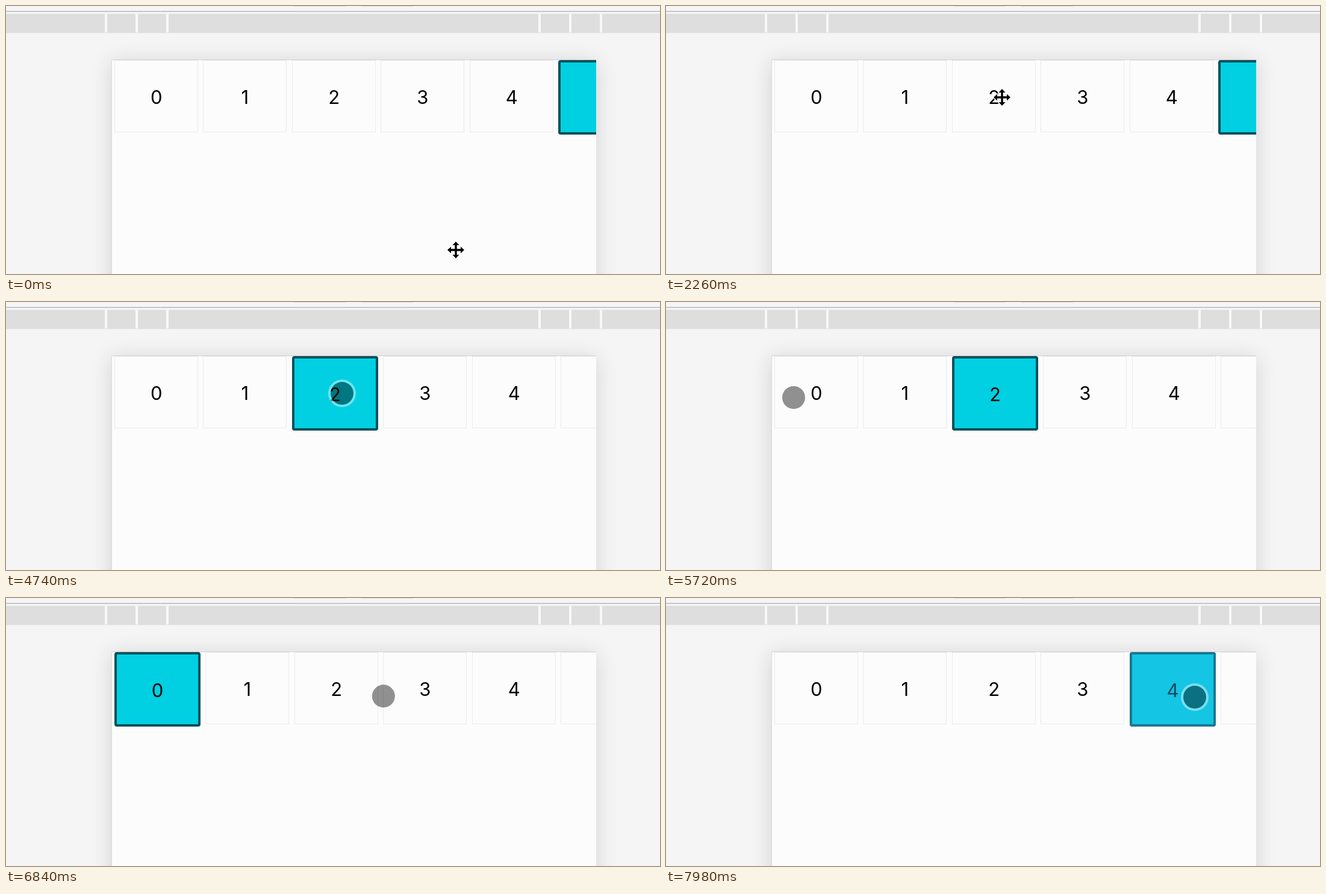
An HTML page with a canvas for the animation above (8 s loop, 1086 px wide and 446 px high).

```html
<!DOCTYPE html>
<html lang="en">
<head>
<meta charset="utf-8">
<style>
html, body { margin: 0; width: 100%; height: 100%; overflow: hidden; background: #f5f5f5; }
canvas { display: block; }
</style>
</head>
<body>
<canvas id="stage" width="1086" height="446"></canvas>
<script>
const ctx = document.getElementById('stage').getContext('2d');
const LOOP = 8000;
const PANEL = { x: 175, y: 89, w: 805, h: 357 };
const PITCH = 147.4;
const TOUCH_START = 3800;

const linear = k => k;
const easeOut = k => 1 - (1 - k) ** 3;
const easeInOut = k => k * k * (3 - 2 * k);

const home = { x: 747, y: 406 };
const moves = [
  { from: 0, to: 1500, x: 648, y: 253, ease: linear },
  { from: 1520, to: 2200, x: 558, y: 152, ease: easeOut },
  { from: 4960, to: 5680, x: 212, y: 159, ease: easeInOut },
  { from: 6450, to: 6945, x: 692, y: 164, ease: easeInOut },
  { from: 7420, to: 7800, x: 878, y: 165, ease: easeInOut }
];

const taps = [
  { time: -1000, cell: 5 },
  { time: 4560, cell: 2 },
  { time: 6200, cell: 0 },
  { time: 7250, cell: 3 },
  { time: 7900, cell: 4 }
];

function rect(x, y, w, h, color) {
  ctx.fillStyle = color;
  ctx.fillRect(x, y, w, h);
}

// the picture advances in short steps, with a brief hold per cycle
function stepTime(t) {
  const phase = (t + 20) % 840;
  const step = 43.5;
  return Math.max(0, t - phase + Math.floor(Math.min(phase, 740) / step + 0.01) * step);
}

function pointerAt(t) {
  let { x, y } = home;
  for (const move of moves) {
    if (t <= move.from) break;
    const k = move.ease(Math.min(1, (t - move.from) / (move.to - move.from)));
    x += (move.x - x) * k;
    y += (move.y - y) * k;
  }
  return { x, y };
}

function drawBackdrop() {
  rect(0, 0, 1086, 446, '#f5f5f5');
  rect(478, 0, 86, 1, '#dcdcdc');
  rect(590, 0, 86, 1, '#dcdcdc');
  rect(0, 8, 1086, 2, '#c6c6ce');

  ctx.save();
  ctx.shadowColor = 'rgba(0, 0, 0, 0.14)';
  ctx.shadowBlur = 34;
  ctx.shadowOffsetY = 4;
  rect(PANEL.x, PANEL.y, PANEL.w, PANEL.h + 100, '#fcfcfc');
  ctx.restore();

  rect(0, 13, 1086, 32, '#dedede');
  for (let i = 0; i < 3; i++) {
    rect(164 + 51 * i, 13, 4, 31, '#f8f8f8');
    rect(884 + 51 * i, 13, 4, 31, '#f8f8f8');
  }

  rect(PANEL.x, PANEL.y, PANEL.w, 1, '#d0d0d8');
  rect(PANEL.x, PANEL.y, 1, PANEL.h, '#dcdce2');
}

function drawLabel(text, x, baseline) {
  ctx.fillStyle = '#000';
  ctx.fillText(text, x, baseline);
}

function drawCells(selected, highlighted) {
  ctx.save();
  ctx.beginPath();
  ctx.rect(PANEL.x, PANEL.y, PANEL.w, PANEL.h);
  ctx.clip();
  ctx.font = '31px Inter, "Open Sans", sans-serif';
  ctx.textAlign = 'center';
  for (let i = 0; i < 6; i++) {
    const x = Math.round(180 + PITCH * i + (i > selected ? 4 : 0));
    if (i !== selected) {
      ctx.strokeStyle = '#ebebee';
      ctx.lineWidth = 1;
      ctx.strokeRect(x + 0.5, 90.5, 138, 119);
      drawLabel(i, x + 69.7, 163);
      continue;
    }
    ctx.beginPath();
    ctx.roundRect(x, 90, 143, 124, 4);
    ctx.fillStyle = '#08505a';
    ctx.fill();
    rect(x + 4, 94, 135, 116, '#00d0e2');
    drawLabel(i, x + 71.5, 165);
    if (highlighted) {
      ctx.fillStyle = 'rgba(51, 181, 229, 0.4)';
      ctx.fill();
    }
  }
  ctx.restore();
}

function drawMoveCursor({ x, y }) {
  ctx.save();
  ctx.translate(Math.round(x), Math.round(y));
  const arrow = new Path2D('M-1.7-1.7V-8H-5.5L0-14L5.5-8H1.7V-1.7');
  const shape = new Path2D();
  for (let i = 0; i < 4; i++) shape.addPath(arrow, new DOMMatrix().rotate(90 * i));
  ctx.lineJoin = 'round';
  ctx.lineWidth = 2.5;
  ctx.strokeStyle = '#fff';
  ctx.stroke(shape);
  ctx.fillStyle = '#000';
  ctx.fill(shape);
  ctx.fillRect(-2, -2, 4, 4);
  ctx.restore();
}

function drawTouch({ x, y }, pressed) {
  ctx.beginPath();
  ctx.arc(x, y, 19, 0, Math.PI * 2);
  ctx.fillStyle = 'rgba(0, 0, 0, 0.43)';
  ctx.fill();
  if (!pressed) return;
  ctx.beginPath();
  ctx.arc(x, y, 21, 0, Math.PI * 2);
  ctx.lineWidth = 4;
  ctx.strokeStyle = 'rgba(255, 255, 255, 0.42)';
  ctx.stroke();
}

function draw(time) {
  const t = stepTime(time);
  const last = taps.filter(tap => tap.time <= t).pop();
  const pressed = taps.some(tap => t > tap.time - 120 && t < tap.time + 260);
  const pointer = pointerAt(t);
  drawBackdrop();
  drawCells(last.cell, t - last.time < 120);
  if (t < TOUCH_START) drawMoveCursor(pointer);
  else drawTouch(pointer, pressed);
}

const start = performance.now();
function tick() {
  draw((performance.now() - start) % LOOP);
  requestAnimationFrame(tick);
}
tick();
</script>
</body>
</html>
```
